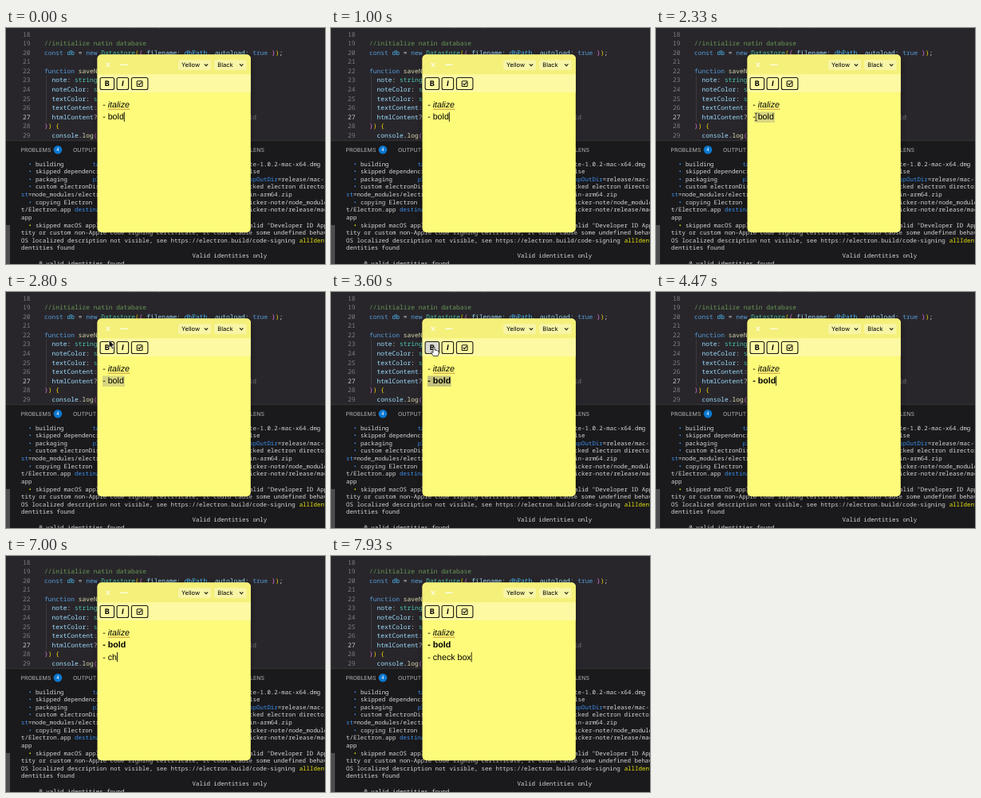
An HTML page that plays this animation: 400 px wide and 297 px high, repeating every 8 s.

```html
<!DOCTYPE html>
<html lang="en">
<head>
<meta charset="utf-8">
<title>Sticky note</title>
<style>
  html, body { margin: 0; width: 100%; height: 100%; overflow: hidden; background: #1a191b; }
  svg { display: block; width: 100%; height: 100%; }
  text { white-space: pre; text-rendering: geometricPrecision; }
  .code { font: 7.92px "Noto Sans Mono", monospace; }
  .term { font: 7.45px "Noto Sans Mono", monospace; }
  .tabs { font: 7px Inter, sans-serif; fill: #b4b4b4; }
  .select { font: 7.5px Inter, sans-serif; }
  .body { font: 10.67px "Liberation Sans", Arial, sans-serif; }
  .button { font: 700 9.2px Inter, sans-serif; text-anchor: middle; }
  .line { fill: none; stroke: #1c1c14; stroke-width: 1.1; }
</style>
</head>
<body>
<svg viewBox="0 0 400 297" preserveAspectRatio="none">
  <defs>
    <filter id="shadow" x="-20%" y="-20%" width="140%" height="140%">
      <feDropShadow dx="0" dy="3" stdDeviation="5" flood-opacity=".35"/>
    </filter>
    <clipPath id="noteShape"><rect x="114.6" y="33.6" width="192.2" height="223.6" rx="5"/></clipPath>
  </defs>

  <rect width="400" height="142" fill="#28262b"/>
  <rect y="142" width="400" height="155" fill="#1a191b"/>
  <rect y="141.5" width="400" height=".7" fill="#3a3a3c"/>
  <rect y="248" width="5" height="49" fill="#4d4c4e"/>
  <rect x="50" y="60" width=".7" height="58" fill="#454448"/>
  <g id="code" class="code"></g>
  <g class="tabs">
    <text x="18.5" y="155.8">PROBLEMS</text>
    <circle cx="65" cy="153.2" r="5.3" fill="#0a78d0"/>
    <text x="65" y="155.4" fill="#fff" text-anchor="middle" style="font-size:6px">4</text>
    <text x="84" y="155.8">OUTPUT</text>
    <text x="306" y="155.8">LENS</text>
  </g>
  <g id="term" class="term"></g>

  <g filter="url(#shadow)">
    <g clip-path="url(#noteShape)">
      <rect x="114" y="33" width="194" height="226" fill="#fefb7a"/>
      <rect x="114" y="33" width="194" height="25.3" fill="#f4f07a"/>
      <rect x="114" y="58.3" width="194" height="22.7" fill="#fdf9a2"/>
    </g>
  </g>
  <path d="M125.6 43.8l4.8 4.8m0-4.8l-4.8 4.8M143 46.3h9.6" stroke="#fffde6" stroke-width="1.2" fill="none"/>
  <g class="select">
    <rect x="216" y="40" width="41" height="13" rx="2.5" fill="#f8f5a6"/>
    <text x="220" y="49.2">Yellow</text>
    <rect x="261" y="40" width="40.5" height="13" rx="2.5" fill="#f8f5a6"/>
    <text x="265.3" y="49.2">Black</text>
    <path class="line" stroke-width="1" d="M248.8 45.4l2.2 2.2 2.2-2.2M293 45.4l2.2 2.2 2.2-2.2"/>
  </g>
  <g transform="translate(-.4)">
    <g class="line">
      <rect id="boldButton" x="118.5" y="62.5" width="17.5" height="15" rx="2"/>
      <rect x="139.5" y="62.5" width="14.5" height="15" rx="2"/>
      <rect x="157.8" y="62.5" width="20.5" height="15" rx="2"/>
      <rect x="164.6" y="66.7" width="6.8" height="6.8" rx="1"/>
      <path d="M166.1 70l1.5 1.6 3-3.6"/>
    </g>
    <g class="button">
      <text x="127.2" y="73.4">B</text>
      <text x="146.7" y="73.4" font-style="italic">I</text>
    </g>
  </g>

  <rect id="selection" y="105.5" height="13.5"/>
  <g class="body">
    <text x="121.2" y="100">- <tspan font-style="italic">italize</tspan></text>
    <path d="M128.2 102.2h27" stroke="#a8581d" stroke-width="1" stroke-dasharray="1.3 .7"/>
    <text id="boldLine" x="121.2" y="115.4">- bold</text>
    <text id="typedLine" x="121.2" y="130.8"></text>
  </g>
  <rect id="caret" width=".9" height="12.2" fill="#111"/>

  <path id="arrow" fill="#111" stroke="#fff" stroke-width=".6"
        d="M0 0v10l2.3-2.1 1.6 3.6 1.6-.7-1.6-3.5h3.1z"/>
  <path id="hand" fill="#fff" stroke="#111" stroke-width=".8" stroke-linejoin="round"
        d="M-1 .7Q0-.7 1 .7V4.2Q2.2 3.4 3 4.6 4 4 4.6 5.2 6 4.8 6.2 6.2V8.4L5 11.6H-.4L-3.3 7.6Q-3.5 6-2.2 6.4L-1 7.5z"/>
  <path id="beam" fill="none" stroke="#222" stroke-width=".8"
        d="M-1.8-5Q0-5 0-4V4Q0 5-1.8 5M1.8-5Q0-5 0-4M0 4Q0 5 1.8 5"/>
</svg>

<script>
const $ = id => document.getElementById(id);
const DURATION = 8000;

function addText(parent, x, y, content, fill, anchor = 'start') {
  const node = document.createElementNS('http://www.w3.org/2000/svg', 'text');
  node.setAttribute('x', x);
  node.setAttribute('y', y);
  node.setAttribute('fill', fill);
  node.setAttribute('text-anchor', anchor);
  node.textContent = content;
  parent.append(node);
}

// Runs are "color:text" strings; "@n" moves to column n.
function addRuns(parent, x, y, pitch, palette, runs) {
  let column = 0;
  for (const run of runs) {
    if (run[0] === '@') { column = +run.slice(1); continue; }
    const content = run.slice(2);
    addText(parent, x + column * pitch, y, content, palette[run[0]]);
    column += content.length;
  }
}

const codeColors = {
  k: '#569cd6', v: '#9cdcfe', c: '#4fc1ff', t: '#4ec9b0', f: '#dcdcaa',
  w: '#d4d4d4', g: '#6a9955', y: '#ffd700', p: '#da70d6', d: '#77777a'
};
const codeLines = [
  ['@22', 'y:(', '@30', 'y:)', 'w:;'],
  [],
  ['g://initialize natin database'],
  ['k:const ', 'c:db ', 'w:= ', 'k:new ', 't:Datastore', 'y:(', 'p:{ ', 'v:filename: ', 'c:dbPath', 'w:, ',
   'v:autoload: ', 'k:true ', 'p:}', 'y:)', 'w:;'],
  [],
  ['k:function ', 'f:saveNote'],
  ['@2', 'v:note', 'w:: ', 't:string'],
  ['@2', 'v:noteColor', 'w:: ', 't:st'],
  ['@2', 'v:textColor', 'w:: ', 't:st'],
  ['@2', 'v:textContent', 'w::'],
  ['@2', 'v:htmlContent', 'w:?:', '@54', 'd:ld'],
  ['p:}', 'y:) {'],
  ['@2', 'v:console', 'w:.', 'f:log', 'p:(']
];
codeLines.forEach((runs, i) => {
  const y = -.9 + i * 11.55;
  addText($('code'), 30.5, y, 17 + i, i === 10 ? '#c6c6c6' : '#7d7d80', 'end');
  addRuns($('code'), 48, y, 4.75, codeColors, runs);
});

const termColors = { w: '#d6d6d6', b: '#3b8eea', y: '#e5e510' };
const termLines = [
  ['@2', 'b:• ', 'w:building        ', 'b:target', '@64', 'w:te-1.0.2-mac-x64.dmg'],
  ['@2', 'b:• ', 'w:skipped dependencies rebuild', '@64', 'w:lse'],
  ['@2', 'b:• ', 'w:packaging       ', 'b:platf', '@64', 'b:ppOutDir', 'w:=release/mac-'],
  ['@2', 'b:• ', 'w:custom electronDist', '@64', 'w:cked electron directory'],
  ['b:st', 'w:=node_modules/electron', '@64', 'w:in-arm64.zip'],
  ['@2', 'b:• ', 'w:copying Electron', '@64', 'w:icker-note/node_modules'],
  ['w:t/Electron.app ', 'b:destination', '@63', 'w:ticker-note/release/mac-'],
  ['w:app'],
  ['@2', 'y:• ', 'w:skipped macOS application code signing  ', 'b:reason', 'w:=cannot find valid "Developer ID Application'],
  ['w:tity or custom non-Apple code signing certificate, it could cause some undefined behaviour'],
  ['w:OS localized description not visible, see https://electron.build/code-signing ', 'y:allIdentities'],
  ['w:dentities found'],
  ['@48', 'w:Valid identities only'],
  ['@5', 'w:0 valid identities found']
];
termLines.forEach((runs, i) => addRuns($('term'), 19, 173.6 + i * 9.62, 4.47, termColors, runs));

const clamp = v => Math.min(1, Math.max(0, v));
const ease = v => v * v * (3 - 2 * v);
const progress = (t, from, to) => ease(clamp((t - from) / (to - from)));
const show = (id, on) => $(id).setAttribute('visibility', on ? 'visible' : 'hidden');
const set = (id, name, value) => $(id).setAttribute(name, value);

// Pointer waypoints: time, x, y
const pointerPath = [[1950, 151, 112], [2050, 150, 112], [2420, 121, 112], [2500, 121, 112],
                     [2780, 129.2, 60.4], [2900, 129.2, 60.4], [3080, 129, 69], [4300, 129, 69]];
const keys = [[5300, '-'], [5800, '- '], [6500, '- c'], [6800, '- ch'], [7100, '- che'], [7220, '- chec'],
              [7340, '- check'], [7470, '- check '], [7600, '- check b'], [7720, '- check bo'], [7850, '- check box']];
const ENTER = 4900, DESELECT = 4300, BOLD = 3250;

function pointerAt(t) {
  const i = pointerPath.findIndex(p => p[0] > t);
  if (i < 1) return null;
  const [t0, x0, y0] = pointerPath[i - 1], [t1, x1, y1] = pointerPath[i];
  const k = progress(t, t0, t1);
  return [x0 + (x1 - x0) * k, y0 + (y1 - y0) * k];
}

function drawPointer(t) {
  const at = pointerAt(t);
  const kind = !at ? '' : at[1] > 82 ? 'beam' : at[1] > 62.5 && t > 2800 ? 'hand' : 'arrow';
  for (const id of ['beam', 'hand', 'arrow']) {
    show(id, id === kind);
    if (id === kind) set(id, 'transform', `translate(${at})`);
  }
  set('boldButton', 'fill', kind === 'hand' ? '#d9d9d2' : 'none');
}

function drawCaret(t) {
  let on;
  if (t < 2000) on = t < 470 || (t >= 930 && t < 1430);
  else if (t < DESELECT) on = false;
  else {
    const lastKey = [DESELECT, ENTER, ...keys.map(k => k[0])].filter(k => k <= t).pop();
    on = (t - lastKey) % 1000 < 500;
  }
  const line = t < ENTER ? 'boldLine' : 'typedLine';
  show('caret', on);
  set('caret', 'x', 121.2 + $(line).getComputedTextLength());
  set('caret', 'y', t < ENTER ? 105.7 : 121.1);
}

function draw(t) {
  const bold = t >= BOLD;
  set('boldLine', 'font-weight', bold ? 700 : 400);
  $('typedLine').textContent = (keys.filter(k => k[0] <= t).pop() || [0, ''])[1];

  const right = bold ? 150.5 : 149;
  const left = right - (right - 121) * progress(t, 2050, 2420);
  show('selection', t > 2050 && t < DESELECT);
  set('selection', 'x', left);
  set('selection', 'width', right - left);
  set('selection', 'fill', bold ? '#c4c27c' : '#d8d67e');

  drawPointer(t);
  drawCaret(t);
}

const start = performance.now();
function tick() {
  draw((performance.now() - start) % DURATION);
  requestAnimationFrame(tick);
}
tick();
</script>
</body>
</html>
```
